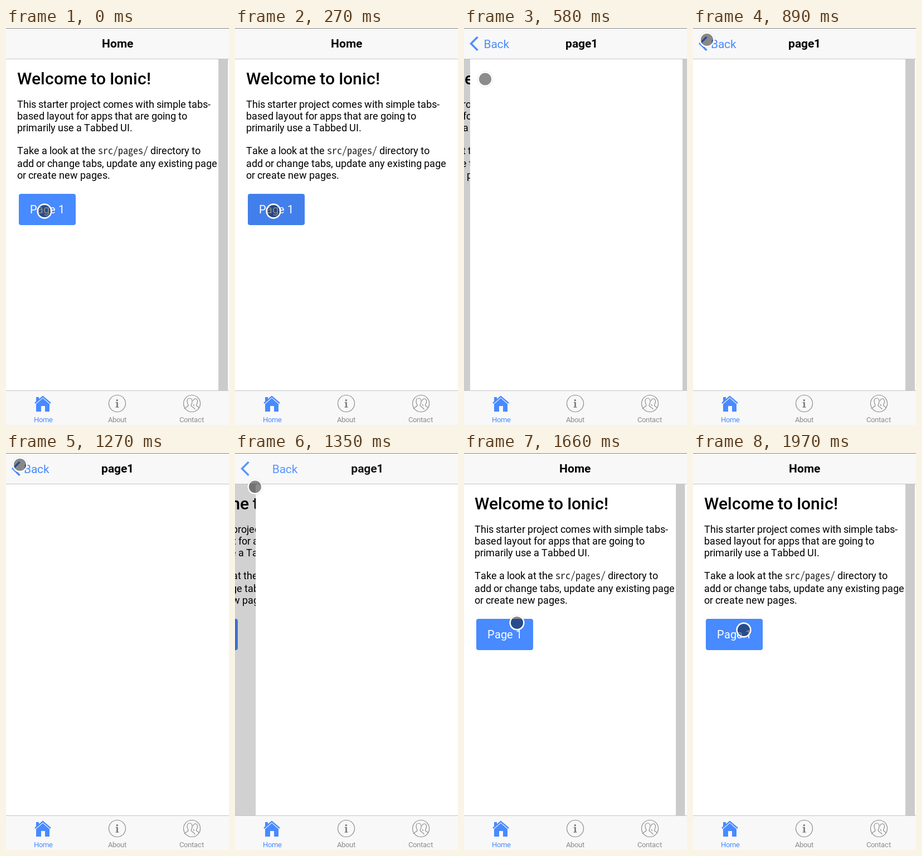
Write an HTML page that moves like this. It is 400 px wide and 711 px high and loops after 2270 ms.

```html
<!DOCTYPE html>
<html lang="en">
<head>
<meta charset="utf-8">
<title>Tabs navigation</title>
<style>
  html, body { margin: 0; width: 100%; height: 100%; overflow: hidden; background: #fff; }
  svg { display: block; width: 100%; height: 100%; font-family: Roboto, sans-serif; }
  text { white-space: pre; }
  .title { font-size: 21px; font-weight: 700; }
  .body { font-size: 18px; }
  .code { font-family: "Noto Sans Mono CJK JP", "Noto Sans Mono CJK SC", "Noto Sans Mono", monospace; fill: #222; }
  .tab { font-size: 13px; fill: #8c8c8c; }
  .icon { fill: none; stroke: #8c8c8c; stroke-width: 1.2; }
  .blue { fill: #488aff; }
</style>
</head>
<body>
<svg viewBox="0 0 400 711">
  <defs>
    <clipPath id="uncovered"><rect id="uncoveredBox" width="400" height="56"/></clipPath>
  </defs>

  <rect y="55" width="400" height="595" fill="#000"/>
  <g id="home">
    <rect y="55" width="400" height="595" fill="#fff"/>
    <text x="20" y="101" font-size="30" font-weight="500">Welcome to Ionic!</text>
    <g class="body">
      <text x="20" y="143">This starter project comes with simple tabs-</text>
      <text x="20" y="164">based layout for apps that are going to</text>
      <text x="20" y="185">primarily use a Tabbed UI.</text>
      <text x="20" y="226">Take a look at the <tspan class="code">src/pages/</tspan> directory to</text>
      <text x="20" y="249">add or change tabs, update any existing page</text>
      <text x="20" y="270">or create new pages.</text>
    </g>
    <rect id="button" x="23" y="297" width="102" height="56" rx="4"/>
    <text x="74" y="332" font-size="20" fill="#fff" data-center>Page 1</text>
    <rect id="homeBar" x="381" y="55" width="17" height="595" fill="#cbcbcb"/>
  </g>
  <g id="page">
    <rect y="55" width="400" height="595" fill="#fff"/>
    <rect id="pageBar" x="381" y="55" width="17" height="595" fill="#cbcbcb"/>
  </g>

  <rect width="400" height="55" fill="#f8f8f8"/>
  <rect width="400" height="1" fill="#858585"/>
  <rect y="55" width="400" height="1" fill="#c4c4c4"/>
  <g clip-path="url(#uncovered)">
    <text id="homeTitle" class="title" x="200" y="35" data-center>Home</text>
  </g>
  <text id="pageTitle" class="title" x="200" y="35" data-center>page1</text>
  <polyline id="arrow" points="24.500,16 12.500,28 24.500,40" fill="none" stroke="#488aff" stroke-width="3.400"/>
  <text id="back" class="blue" x="32" y="36" font-size="21">Back</text>

  <rect y="649" width="400" height="62" fill="#f8f8f8"/>
  <rect y="649" width="400" height="1" fill="#c4c4c4"/>
  <path class="blue" d="M54 661h5v5l-5 4.500zM54 673.500 66 663l12 10.500V687h-8v-10h-7v10h-9z"/>
  <polyline points="52,672 66,660 80,672" fill="none" stroke="#488aff" stroke-width="2.400"/>
  <circle class="icon" cx="199.500" cy="672.500" r="15"/>
  <circle cx="199.300" cy="666.800" r="1.700" fill="#777"/>
  <path d="M196.500 670h4.300v8.500h1.700v1.200h-6v-1.200h1.700v-7.300h-1.700z" fill="#777"/>
  <circle class="icon" cx="333.500" cy="672.500" r="15"/>
  <path class="icon" d="M320 682c1-3 6-3 7-6 0-2-2-3-2-7 0-4 2-6 4.500-6s4.500 2 4.500 6c0 4-2 5-2 7 1 3 6 3 7 7M335.500 668c1-3 2-4 4-4 3 0 4 2 4 5 0 4-2 4-2 7 .5 1.500 3 2 4.500 4M336 674c1 1 1.500 2 1 3"/>
  <text class="tab" x="67" y="706" style="fill:#488aff" data-center>Home</text>
  <text class="tab" x="200" y="706" data-center>About</text>
  <text class="tab" x="333" y="706" data-center>Contact</text>

  <g id="pointer">
    <circle r="14" fill="none" stroke="#000" stroke-opacity=".12"/>
    <circle r="11.500" fill="#000" fill-opacity=".45"/>
    <circle r="12.400" fill="none" stroke="#fff" stroke-width="2.600"/>
  </g>
</svg>
<script>
  const LOOP = 2270, BEAT = 77.6, SLIDE = 435;

  // each move runs in beats; path holds [beat, x, y] of the pointer
  const push = { at: 270, delay: 40, path: [[0, 69, 328], [2, 62, 169], [6, 14, 14], [8, 25, 21]] };
  const pop = { at: 1270, delay: 57, path: [[0, 25, 21], [2, 47, 100], [5, 95, 304], [9, 91, 317]] };

  const el = {};
  document.querySelectorAll("[id]").forEach(e => el[e.id] = e);

  const move = (e, x, y = 0) => e.setAttribute("transform", `translate(${x} ${y})`);
  const fade = (e, a) => e.setAttribute("opacity", a);
  const show = (e, on) => e.setAttribute("visibility", on ? "inherit" : "hidden");
  const clamp = v => Math.min(1, Math.max(0, v));
  const mix = (a, b, k) => a + (b - a) * k;

  // whole-pixel glyph advances, as in hinted text
  const pen = document.createElement("canvas").getContext("2d");
  function snap(text) {
    const widths = [];
    for (const node of text.childNodes) {
      const css = getComputedStyle(node.nodeType === 1 ? node : text);
      pen.font = `${css.fontWeight} ${css.fontSize} ${css.fontFamily}`;
      for (const c of node.textContent) widths.push(Math.round(pen.measureText(c).width));
    }
    let x = +text.getAttribute("x");
    if ("center" in text.dataset) x -= Math.ceil(widths.reduce((a, b) => a + b) / 2);
    text.setAttribute("x", widths.map(w => (x += w) - w).join(" "));
  }

  // cubic-bezier(.36, .66, .04, 1)
  function ease(k) {
    const curve = (s, a, b) => 3 * a * s * (1 - s) ** 2 + 3 * b * s * s * (1 - s) + s ** 3;
    let lo = 0, hi = 1;
    for (let i = 0; i < 20; i++) {
      const mid = (lo + hi) / 2;
      if (curve(mid, .36, .04) < k) lo = mid; else hi = mid;
    }
    return k >= 1 ? 1 : k <= 0 ? 0 : curve(lo, .66, 1);
  }

  function along(path, beat) {
    const i = Math.max(1, path.findIndex(p => p[0] >= beat));
    const [a, b] = [path[i - 1], path[i]];
    const k = (beat - a[0]) / (b[0] - a[0]);
    return [mix(a[1], b[1], k), mix(a[2], b[2], k)];
  }

  function draw(t) {
    const run = t < pop.at ? push : pop;
    const last = run.path.at(-1)[0];
    const beat = Math.min(last, Math.max(0, Math.floor((t - run.at + 4) / BEAT)));
    const p = ease(clamp((beat * BEAT - run.delay) / SLIDE));
    const sliding = t >= run.at && p < 1;
    const pushing = sliding && run === push;

    // cover: 0 = home in front, 1 = second page fully over it
    const cover = run === push ? p : 1 - p;
    const left = (pushing ? 398 : 400) * (1 - cover);
    const shift = Math.round(-132 * cover);

    move(el.home, shift);
    fade(el.home, 1 - .2 * cover);
    move(el.page, left);
    show(el.page, cover > 0);
    show(el.homeBar, !pushing);
    show(el.pageBar, run === push);
    el.button.setAttribute("fill", pushing ? "#427feb" : "#488aff");

    el.uncoveredBox.setAttribute("width", cover > 0 ? left : 400);
    move(el.homeTitle, shift);
    fade(el.homeTitle, 1 - cover);
    move(el.pageTitle, left);
    fade(el.pageTitle, cover);
    move(el.back, (run === push ? 125 : 375) * (1 - cover));
    fade(el.back, cover);
    fade(el.arrow, cover);
    move(el.pointer, ...along(run.path, beat));
  }

  function tick() {
    draw(performance.now() % LOOP);
    requestAnimationFrame(tick);
  }
  document.querySelectorAll("text").forEach(snap);
  tick();
</script>
</body>
</html>
```
